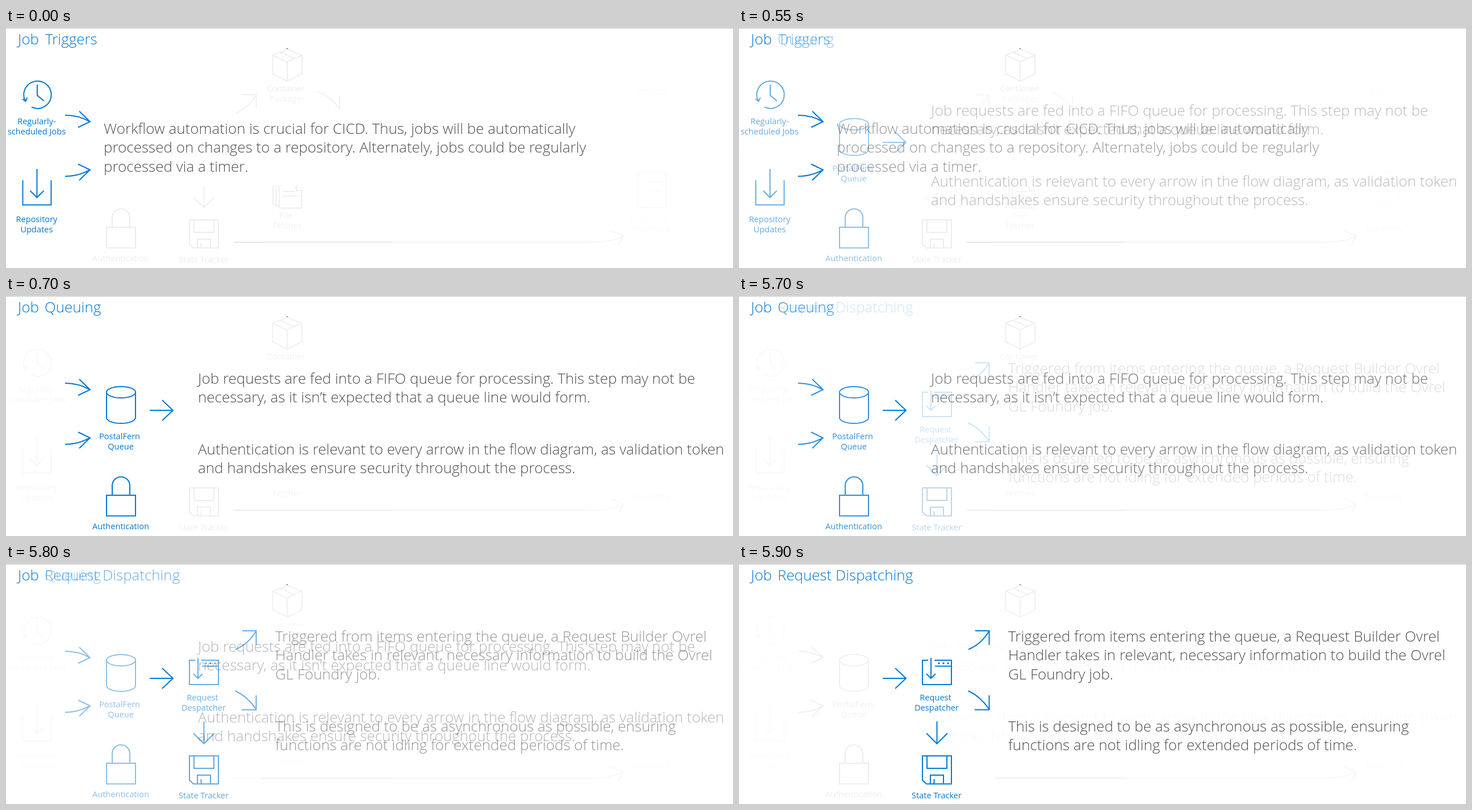
These frames come from a looping animation (1280x424 px, 8 s). An HTML page:

```html
<!DOCTYPE html>
<html lang="en">
<head>
<meta charset="utf-8">
<title>Job flow</title>
<style>
  html, body { margin: 0; width: 100%; height: 100%; overflow: hidden; background: #fff; }
  svg { display: block; width: 100%; height: 100%; }
  path { fill: none; stroke: currentColor; stroke-width: 2; }
  text { fill: currentColor; font-family: "Open Sans", "Noto Sans", sans-serif; white-space: pre; }
  .title { font-size: 25.9px; font-weight: 300; }
  .body { font-size: 26px; font-weight: 300; }
  .label { font-size: 14.6px; text-anchor: middle; }
  .dots { stroke-width: 3.4; stroke-linecap: round; }
</style>
</head>
<body>
<svg id="stage" viewBox="0 0 1280 424" xmlns="http://www.w3.org/2000/svg">
  <rect width="1280" height="1" fill="#c8c8c8"/>
  <rect x="493.5" y="36" width="3" height="1" fill="#555"/>
</svg>
<script>
const LOOP = 8000, FADE = 250, CUTS = [500, 5700];
const BLUE = 'rgba(0,120,215,1)', INK = 'rgba(80,80,80,1)';
const stage = document.getElementById('stage');

function add(parent, tag, attrs, content) {
  const el = document.createElementNS('http://www.w3.org/2000/svg', tag);
  for (const key in attrs) el.setAttribute(key, attrs[key]);
  if (content) el.textContent = content;
  parent.append(el);
  return el;
}

const line = (d, cls = '') => g => add(g, 'path', { d, class: cls });
const words = (cls, x, y, str) => g => add(g, 'text', { x, y, class: cls }, str);
const label = (x, y, str) => words('label', x, y, str);
const para = (x, y, ...rows) => g => rows.forEach((row, i) => words('body', x, y + i * 33.3, row)(g));

// A number is the strength of a faint grey remnant.
const tint = c => typeof c === 'number' ? `rgba(0,0,0,${c})` : c;

// Three tints, one per scene; each cut is a fade in five equal steps.
function part(tints, ...draw) {
  const g = add(stage, 'g', {});
  draw.forEach(fn => fn(g));
  const [a, b, c] = tints.map(tint);
  const at = ms => (ms - 0.5) / LOOP;
  const easing = 'steps(5, start)';
  g.animate([
    { offset: 0, color: a },
    { offset: at(CUTS[0]), color: a, easing },
    { offset: at(CUTS[0] + FADE), color: b },
    { offset: at(CUTS[1]), color: b, easing },
    { offset: at(CUTS[1] + FADE), color: c },
    { offset: 1, color: c }
  ], { duration: LOOP, iterations: Infinity });
}

// Distant remnants
part([.065, .06, .055],
  line('M495 38L521 48V81L495 94L469.5 81V48ZM469.5 48L495 60L521 48M495 60V94M482 43L508 54'));
part([.08, .06, 0], label(493, 112, 'Container'));
part([.06, 0, 0], label(495, 130, 'Packager'),
  line('M550 113Q572 121 587 143M587 120V144'));
part([.065, 0, 0], label(493, 336, 'File'),
  line('M470 278V311H477M475.5 278V314H481M481 278V318H520.5V287H511V278M487 289H509M487 297H513'));
part([.06, .05, 0], label(495, 354, 'Fetcher'));
part([.1, .08, 0], line('M400 378.5H450'));
part([.09, .08, .06], line('M450 378.5H680'));
part([.05, .045, .035], line('M680 378.5H1030'));
part([.04, .035, .03], line('M1030 378.5Q1068 378 1086 368M1066 358L1087 367.5L1078 384'));
part([.015, .006, 0],
  line('M1114 125A11 11 0 0 1 1135 115M1140 115A11 11 0 0 1 1161 125'));
part([.016, 0, 0],
  line('M1112 256H1162V317H1112ZM1119 272H1125M1133 272H1155M1119 288H1125M1133 288H1155M1119 304H1125M1133 304H1155'),
  label(1134, 342, 'Diagnostic'));
part([.025, .028, .015], label(1135, 360, 'Telemetry'));

// Triggers
part([BLUE, .03, .015],
  line('M33.5 128A24.2 24.2 0 1 1 45 139.7M29 125.5L34.5 129.5L37.5 123M55 100V119L67 129'),
  label(54, 169.5, 'Regularly-'), label(54, 187.5, 'scheduled Jobs'),
  line('M29.5 269V312.5H79.5V269M54.5 249V299M42.5 287.5L54.5 299.5L66.5 287.5'),
  label(54, 342.5, 'Repository'), label(54, 360.5, 'Updates'));
part([BLUE, BLUE, .06],
  line('M104 154Q127 154 147 165M129 147L148 165.5L127 175.5'),
  line('M104 262Q127 262 147 251M127 240.5L148 250.5L129 269'));

// Queue
part([0, BLUE, .06],
  line('M177 170A25.5 10 0 0 1 228 170A25.5 10 0 0 1 177 170V215A25.5 10 0 0 0 228 215V170'),
  label(200, 252.5, 'PostalFern'), label(202, 271, 'Queue'));
part([0, BLUE, BLUE], line('M253 202H293M275 184L294 202L275 220'));
part([.075, BLUE, .07],
  line('M177 352H228V388.5H177ZM187 352V335A15.5 15.5 0 0 1 218 335V352'),
  label(202, 412, 'Authentication'));

// Dispatch
part([0, 0, BLUE],
  line('M333 170H323V213H374V170H344M345 180.5H374M338 166V202M330 194L338 202L346 194'),
  line('M352 175.5h.01M360 175.5h.01M368 175.5h.01', 'dots'),
  label(346, 241, 'Request'), label(348, 258.5, 'Despatcher'),
  line('M403.5 224Q425 234 440 256M440.5 232V257.5H415'));
part([.06, 0, BLUE], line('M404 151Q427 141 440 119M416 118H440.5V143'));
part([.055, 0, BLUE], line('M348.5 278V317M330 299L348.5 317.5L367 299'));
part([.075, .065, BLUE],
  line('M323 339H374V388.5H330L323 382ZM331 339V361H366V339M337 388V373H360V388M343.5 380V388'),
  label(348, 413.5, 'State Tracker'));

// Titles
part([BLUE, BLUE, BLUE], words('title', 21, 28.5, 'Job'));
part([BLUE, 0, 0], words('title', 69, 28.5, 'Triggers'));
part([0, BLUE, 0], words('title', 68, 28.5, 'Queuing'));
part([0, 0, BLUE], words('title', 68, 28.5, 'Request Dispatching'));

// Explanations
part([INK, 0, 0], para(172, 187,
  'Workflow automation is crucial for CICD. Thus, jobs will be automatically',
  'processed on changes to a repository. Alternately, jobs could be regularly',
  'processed via a timer.'));
part([0, INK, .025],
  para(338, 154.5,
    'Job requests are fed into a FIFO queue for processing. This step may not be',
    'necessary, as it isn’t expected that a queue line would form.'),
  para(338, 280,
    'Authentication is relevant to every arrow in the flow diagram, as validation token',
    'and handshakes ensure security throughout the process.'));
part([0, 0, INK],
  para(474, 137,
    'Triggered from items entering the queue, a Request Builder Ovrel',
    'Handler takes in relevant, necessary information to build the Ovrel',
    'GL Foundry job.'),
  para(474, 295.5,
    'This is designed to be as asynchronous as possible, ensuring',
    'functions are not idling for extended periods of time.'));
</script>
</body>
</html>
```
